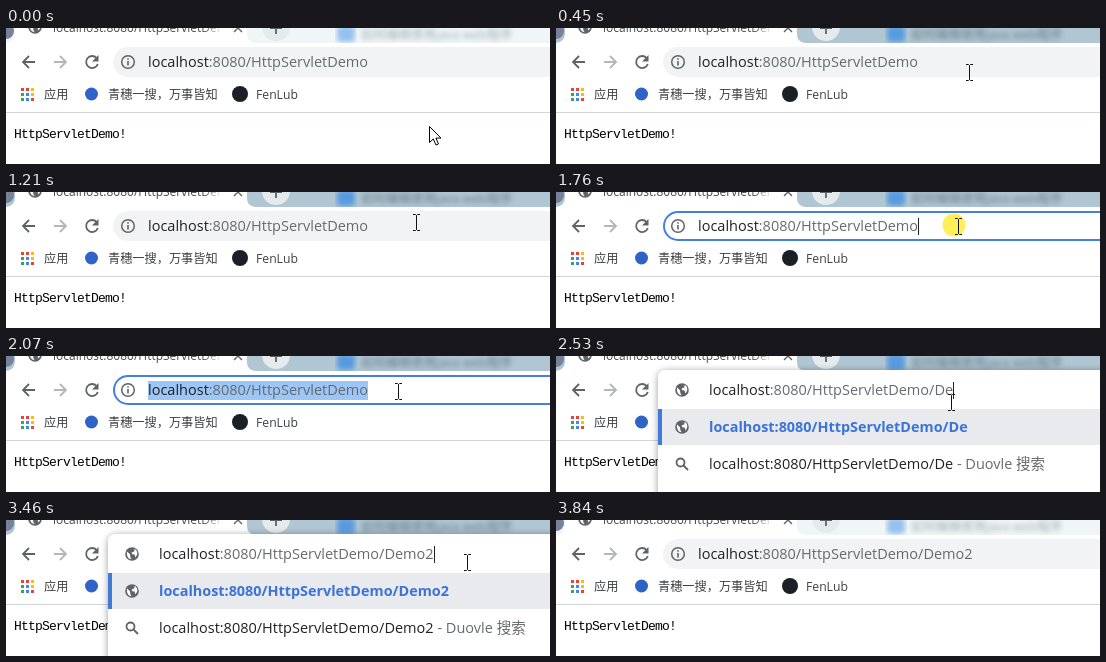
Animation of 544x136 px, one loop 3.92 s. Source, as an HTML page:

```html
<!DOCTYPE html>
<html lang="zh">
<head>
<meta charset="utf-8">
<title>Address bar</title>
<style>
html, body { margin: 0; width: 100%; height: 100%; overflow: hidden; background: #fff; }
svg { display: block; width: 544px; height: 136px; }
text { font-family: 'Open Sans', 'Noto Sans CJK SC', 'Noto Sans CJK', sans-serif; white-space: pre; }
.url { font-size: 14.5px; fill: #202124; }
.dim { fill: #666a6e; }
.mark { font-size: 12.2px; fill: #3c4043; }
.line { fill: none; stroke: #5f6368; stroke-width: 1.8; }
.page { font: 13px 'Liberation Mono', monospace; letter-spacing: -.8px; fill: #000; }
</style>
</head>
<body>
<svg viewBox="0 0 544 136">
  <defs>
    <linearGradient id="fade">
      <stop offset="0" stop-color="#fff" stop-opacity="0"/>
      <stop offset="1" stop-color="#fff"/>
    </linearGradient>
    <filter id="blur" x="-10%" y="-80%" width="120%" height="260%"><feGaussianBlur stdDeviation="2.6"/></filter>
    <filter id="shade" x="-5%" y="-10%" width="110%" height="120%">
      <feDropShadow dx="0" dy="1" stdDeviation="3.5" flood-color="#000" flood-opacity=".4"/>
    </filter>
    <g id="globe">
      <circle r="6.8" fill="#5f6368"/>
      <path d="M-5 -2.6 L-2 .2 L-1.6 3.2 L-.4 5.2 C-3.6 5 -5.6 2 -5 -2.6Z M-.6 -5.2 L2.6 -4.6 L2.2 -2.4 L-.4 -1.6 L.2 .2 L2.6 .6 L3.4 3.4 C6 1 5.8 -2.6 3.6 -4.4Z" fill="#fff"/>
    </g>
  </defs>

  <rect width="544" height="136" fill="#fff"/>

  <!-- tab strip -->
  <rect id="strip" width="544" height="15"/>
  <circle cx="0" cy="3" r="8" fill="#77819a"/>
  <path d="M0 15 Q9 14 9 5 V0 H241 V6 Q241 14 249 15Z" fill="#fff"/>
  <use href="#globe" x="29" y="-1"/>
  <text x="47" y="4" font-size="12" fill="#45494d">localhost:8080/HttpServletDemo</text>
  <rect x="196" y="-8" width="21" height="17" fill="url(#fade)"/>
  <rect x="217" y="-8" width="20" height="17" fill="#fff"/>
  <path class="line" style="stroke-width:1.4" d="M228 -4 L236 4 M236 -4 L228 4"/>
  <circle cx="270" cy="-1" r="14" fill="#e5eaed"/>
  <path class="line" d="M264 0 H276 M270 -6 V6"/>
  <g id="other">
    <rect x="331" y="-2" width="18" height="16" rx="4" fill="#3b8ce4" filter="url(#blur)"/>
    <text x="355" y="11" font-size="12.500" fill="#4d6370" filter="url(#blur)">如何编辑使用java web程序</text>
  </g>

  <!-- toolbar -->
  <rect y="15" width="544" height="69" fill="#fff"/>
  <path class="line" d="M29 34 H17 M23 28 L17 34 L23 40"/>
  <path class="line" style="stroke:#b4b7ba" d="M48 34 H60 M54 28 L60 34 L54 40"/>
  <path class="line" d="M90.6 30 A6 6 0 1 0 91.8 36"/>
  <path d="M92.5 27 V33.5 H86Z" fill="#5f6368"/>
  <rect id="bar" x="108" y="20" width="480" height="28" rx="14"/>
  <rect id="mark" x="142" y="25" width="220" height="19" fill="#9cc6f6"/>
  <circle class="line" style="stroke-width:1.5" cx="122" cy="34" r="6.3"/>
  <path class="line" style="stroke-width:1.6" d="M122 33 V37.5 M122 30.2 V31.8"/>
  <text class="url" id="addr" x="142" y="39">localhost<tspan class="dim">:8080/HttpServletDemo<tspan class="tail"></tspan></tspan></text>
  <rect id="caret" y="26" width="1" height="17" fill="#202124"/>

  <!-- bookmarks -->
  <g id="apps"></g>
  <text class="mark" x="38" y="71">应用</text>
  <circle cx="85.5" cy="66" r="6.5" fill="#2f63c8"/>
  <text class="mark" x="102" y="71">青穗一搜，万事皆知</text>
  <circle cx="234" cy="66" r="8" fill="#1b1f26"/>
  <text class="mark" x="250" y="71">FenLub</text>
  <rect y="84" width="544" height="1" fill="#d3d6d9"/>
  <text class="page" x="8" y="110">HttpServletDemo!</text>

  <!-- suggestions -->
  <g id="panel">
    <rect x="102" y="14" width="500" height="160" rx="8" fill="#fff" filter="url(#shade)"/>
    <rect x="102" y="53" width="442" height="36" fill="#e8eaed"/>
    <rect x="102" y="53" width="4" height="36" fill="#4179d9"/>
    <use href="#globe" x="126" y="34"/>
    <use href="#globe" x="126" y="71"/>
    <circle class="line" cx="124.5" cy="106.5" r="4"/>
    <path class="line" d="M127.5 109.5 L132 114"/>
    <text class="url" id="edit" x="153" y="39">localhost<tspan class="dim">:8080/HttpServletDemo<tspan class="tail"></tspan></tspan></text>
    <text x="153" y="76" font-size="14.4" font-weight="700" fill="#3c73d8">localhost:8080/HttpServletDemo<tspan class="tail"></tspan></text>
    <text class="url" x="153" y="113">localhost:8080/HttpServletDemo<tspan class="tail"></tspan><tspan class="dim"> - Duovle 搜索</tspan></text>
    <rect id="caret2" y="26" width="1" height="17" fill="#202124"/>
  </g>

  <!-- pointer -->
  <circle id="press" r="11.5" fill="#ffec3d" fill-opacity=".85"/>
  <path id="arrow" d="M0 0 V16 L3.8 12.5 L6.5 18.5 L9 17.4 L6.4 11.6 H11.5Z" fill="#fff" stroke="#000"/>
  <path id="beam" d="M-3.5 -8 H-1 L0 -7 L1 -8 H3.5 M0 -7 V7 M-3.5 8 H-1 L0 7 L1 8 H3.5" fill="none" stroke="#111"/>
</svg>
<script>
const LOOP = 3920;
const $ = id => document.getElementById(id);
const show = (id, on) => { $(id).style.display = on ? '' : 'none'; };
const within = (t, a, b) => t >= a && t < b;
const tails = document.querySelectorAll('.tail');

const hues = ['#ea4335', '#ea4335', '#fbbc04', '#34a853', '#4285f4', '#fbbc04', '#34a853', '#4285f4', '#ea4335'];
$('apps').innerHTML = hues.map((c, i) =>
  `<rect x="${15 + i % 3 * 5}" y="${60 + Math.floor(i / 3) * 5}" width="3" height="3" fill="${c}"/>`).join('');

// time, x, y
const path = [
  [0, 423, 98], [70, 423, 98], [530, 411, 33], [680, 408, 32], [830, 408, 32],
  [1140, 410, 30], [1310, 410, 30], [1610, 408, 33], [1990, 392, 35], [2230, 392, 35],
  [2690, 397, 52], [2940, 407, 70], [3020, 407, 70], [3460, 461, 42], [3510, 461, 42],
  [3740, 560, 36], [LOOP, 560, 36]
];
const keys = [2310, 2380, 2460, 2540, 2610, 2790];

function pointer(t) {
  const i = path.findIndex(p => p[0] > t);
  const [a, b] = [path[i - 1], path[i]];
  const k = (t - a[0]) / (b[0] - a[0]);
  return [1, 2].map(n => Math.round(a[n] + (b[n] - a[n]) * k));
}

function render(t) {
  const active = within(t, 150, 3740);
  $('strip').setAttribute('fill', active ? '#b0c6d2' : '#f0f6f7');
  $('other').setAttribute('opacity', active ? .75 : .5);

  const tail = '/Demo2'.slice(0, keys.filter(k => t >= k).length);
  tails.forEach(e => { if (e.textContent !== tail) e.textContent = tail; });

  const open = within(t, 2310, 3590);
  const focus = within(t, 680, 980) || within(t, 1760, 3590);
  const selected = within(t, 830, 980) || within(t, 1910, 2230);
  const bar = $('bar');
  bar.setAttribute('fill', focus ? '#fff' : '#f1f3f4');
  bar.setAttribute('stroke', focus ? '#4380df' : '#f1f3f4');
  bar.setAttribute('stroke-width', 2);
  show('mark', selected);
  show('caret', focus && !selected && !open);
  show('panel', open);
  $('caret').setAttribute('x', Math.round(142 + $('addr').getComputedTextLength()));
  if (open) $('caret2').setAttribute('x', Math.round(153 + $('edit').getComputedTextLength()));

  const [x, y] = pointer(t);
  const text = y < 50;
  show('arrow', !text);
  show('beam', text);
  show('press', within(t, 680, 830) || within(t, 1760, 1910));
  $('arrow').setAttribute('transform', `translate(${x + .5} ${y + .5})`);
  $('beam').setAttribute('transform', `translate(${x + .5} ${y + .5})`);
  $('press').setAttribute('transform', `translate(${x - 4} ${y - 1})`);
}

const start = performance.now();
function tick() {
  render((performance.now() - start) % LOOP);
  requestAnimationFrame(tick);
}
tick();
</script>
</body>
</html>
```
